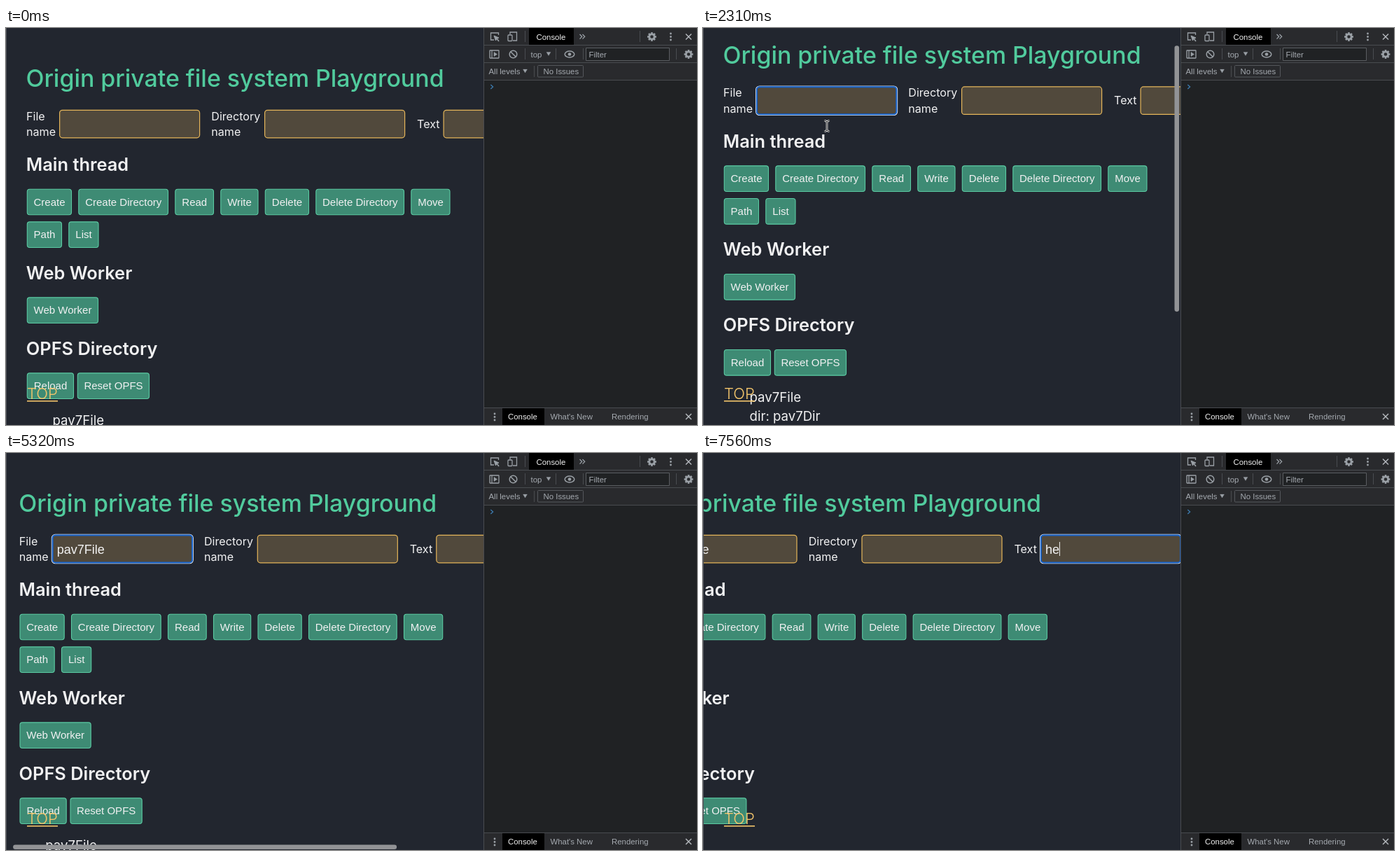
Write an HTML page with a canvas that moves like this. It is 987 px wide and 567 px high and loops after 8000 ms.

```html
<!DOCTYPE html>
<html lang="en">
<head>
<meta charset="utf-8">
<title>File system playground</title>
<style>
html, body { margin: 0; width: 100%; height: 100%; overflow: hidden; background: #22262f; }
canvas { display: block; }
</style>
</head>
<body>
<canvas id="stage" width="987" height="567"></canvas>
<script>
const ctx = document.getElementById('stage').getContext('2d');
const LOOP = 8000, STEP = 70;
const SPLIT = 682;
const PAGE_FONT = 'Inter, "Noto Sans", sans-serif';
const UI_FONT = '"Liberation Sans", Arial, sans-serif';
const LINE = '#494c50', BAR = '#292a2d', ICON = '#9aa0a6';

const BUTTONS = [
  ['Create', 30, 230, 64], ['Create Directory', 103.5, 230, 128.5], ['Read', 241.5, 230, 55.5],
  ['Write', 306.5, 230, 54], ['Delete', 370, 230, 63], ['Delete Directory', 442.5, 230, 126.5],
  ['Move', 578.5, 230, 56], ['Path', 30, 276.7, 50], ['List', 89.5, 276.7, 43],
  ['Web Worker', 30, 384.7, 102], ['Reload', 30, 492.7, 67], ['Reset OPFS', 102, 492.7, 103]
];
const NAME_KEYS = [3640, 3850, 3920, 4060, 4340, 4550, 4690, 4760];
const TEXT_KEYS = [7420, 7560];
const FOCUS_NAME = 1400, FOCUS_TEXT = 6280;

// [time, value] pairs, linear in between
const SCROLL_Y = [[1680, 0], [1750, 2], [1890, 16], [2100, 46], [2170, 50], [2240, 46],
  [2450, 8], [2520, 1], [2590, -1.2], [2660, -0.7], [2870, 0]];
const SCROLL_X = [[5250, 0], [5320, 10.3], [5390, 45], [5460, 85], [5530, 118], [5600, 138],
  [5670, 147], [5810, 146.4], [6020, 142.6]];

function track(keys, t) {
  if (t <= keys[0][0]) return keys[0][1];
  for (let i = 1; i < keys.length; i++) {
    const [t0, a] = keys[i - 1], [t1, b] = keys[i];
    if (t < t1) return a + (b - a) * (t - t0) / (t1 - t0);
  }
  return keys[keys.length - 1][1];
}

const clamp = v => Math.max(0, Math.min(1, v));
const typed = (word, keys, t) => word.slice(0, keys.filter(k => t >= k).length);

function rect(x, y, w, h, color) {
  ctx.fillStyle = color;
  ctx.fillRect(x, y, w, h);
}

function round(x, y, w, h, r, fill, stroke, width = 1) {
  ctx.beginPath();
  ctx.roundRect(x, y, w, h, r);
  if (fill) { ctx.fillStyle = fill; ctx.fill(); }
  if (stroke) { ctx.strokeStyle = stroke; ctx.lineWidth = width; ctx.stroke(); }
}

function text(str, x, y, size, color, font = PAGE_FONT, align = 'left', weight = 400) {
  ctx.font = `${weight} ${size}px ${font}`;
  ctx.textAlign = align;
  ctx.fillStyle = color;
  ctx.fillText(str, x, y);
}

function path(points, color, width = 1.3, close = false, fill = null) {
  ctx.beginPath();
  points.forEach(([x, y], i) => i ? ctx.lineTo(x, y) : ctx.moveTo(x, y));
  if (close) ctx.closePath();
  if (fill) { ctx.fillStyle = fill; ctx.fill(); }
  ctx.strokeStyle = color;
  ctx.lineWidth = width;
  ctx.stroke();
}

function disc(x, y, r, color, width = 0) {
  ctx.beginPath();
  ctx.arc(x, y, r, 0, 7);
  if (width) { ctx.strokeStyle = color; ctx.lineWidth = width; ctx.stroke(); }
  else { ctx.fillStyle = color; ctx.fill(); }
}

function input(x, value, focused, caretOn) {
  round(x + 0.6, 117.3, 200, 39.5, 4, '#51493c', focused ? null : '#e6b65a', 1.2);
  if (focused) {
    round(x - 0.4, 116.3, 202, 41.5, 5, null, '#e6eefa', 1.1);
    round(x + 0.9, 117.6, 199.4, 38.9, 4, null, '#1763cb', 2);
  }
  text(value, x + 7, 143.5, 18, '#f3f3f3', UI_FONT);
  if (focused && caretOn) rect(x + 7 + ctx.measureText(value).width, 127, 1, 20, '#f3f3f3');
}

function caretVisible(t) {
  const keys = [FOCUS_NAME + 65, FOCUS_TEXT, ...NAME_KEYS, ...TEXT_KEYS];
  const last = Math.max(...keys.filter(k => k <= t), 0);
  return Math.floor((t - last) / 500) % 2 === 0;
}

function page(t) {
  const sx = track(SCROLL_X, t), sy = track(SCROLL_Y, t);
  const white = '#f1f1f2';
  ctx.save();
  ctx.beginPath();
  ctx.rect(0, 0, SPLIT, 567);
  ctx.clip();
  rect(0, 0, SPLIT, 567, '#22262f');

  ctx.save();
  ctx.translate(-sx, -sy);
  text('Origin private file system Playground', 28.5, 84, 33.9, '#51cb9d', PAGE_FONT, 'left', 500);
  text('File', 29, 131.7, 16.1, white);
  text('name', 29, 153.9, 16.1, white);
  text('Directory', 293.3, 131.7, 16.1, white);
  text('name', 293.3, 153.9, 16.1, white);
  text('Text', 587, 142.7, 16.1, white);

  const caret = caretVisible(t);
  input(76, typed('pav7File', NAME_KEYS, t), t >= FOCUS_NAME && t < FOCUS_TEXT, caret);
  input(369, '', false, false);
  input(624.5, typed('he', TEXT_KEYS, t), t >= FOCUS_TEXT, caret);

  [['Main thread', 204], ['Web Worker', 358.5], ['OPFS Directory', 466.5]].forEach(([s, y]) =>
    text(s, 28.8, y, 25.4, white, PAGE_FONT, 'left', 600));

  for (const [label, x, y, w] of BUTTONS) {
    round(x + 0.3, y + 0.2, w - 0.8, 36.6, 3.5, '#3e8b74', '#5bcba3', 1.1);
    text(label, x + w / 2, y + 23.7, 15, white, UI_FONT, 'center');
  }
  text('pav7File', 66.5, 567.3, 18.6, white);
  text('dir: pav7Dir', 66.5, 594.3, 18.6, white);
  ctx.restore();

  text('TOP', 30, 530.3, 22, '#f3c56b', PAGE_FONT, 'left', 300);
  rect(30, 532, 44, 1.6, '#f3c56b');

  if (t >= 1750 && t < 3080) scrollbar(673.5, 2.5 + sy * 0.68, 6.6, 380, (3080 - t) / 280);
  if (t >= 5320 && t < 6370) scrollbar(2 + sx * 0.785, 559.5, 548, 6.5, (6370 - t) / 280);
  rect(0, 0, 1, 567, '#4b4e55');
  ctx.restore();
}

function scrollbar(x, y, w, h, alpha) {
  ctx.globalAlpha = clamp(alpha);
  round(x, y, w, h, 3.3, '#929396');
  ctx.globalAlpha = 1;
}

function gear(x, y) {
  for (let i = 0; i < 8; i++) {
    const a = i * Math.PI / 4, c = Math.cos(a), s = Math.sin(a);
    path([[x + 3 * c, y + 3 * s], [x + 6.4 * c, y + 6.4 * s]], ICON, 2.6);
  }
  disc(x, y, 3.7, ICON, 2.8);
}

function dots(x, y) {
  [-4.5, 0, 4.5].forEach(d => disc(x, y + d, 1.4, ICON));
}

function cross(x, y) {
  path([[x - 4, y - 4], [x + 4, y + 4]], '#b5b9be', 1.5);
  path([[x + 4, y - 4], [x - 4, y + 4]], '#b5b9be', 1.5);
}

function down(x, y) {
  path([[x - 3, y - 2.5], [x + 3, y - 2.5], [x, y + 2.5]], ICON, 0.3, true, ICON);
}

function devtools() {
  const ui = (s, x, y, color = '#a5aab0') => text(s, x, y, 11.4, color, UI_FONT);
  rect(SPLIT, 0, 305, 567, '#202224');
  rect(SPLIT, 0, 305, 74, BAR);
  rect(SPLIT, 543, 305, 24, BAR);
  [24, 49, 74, 542].forEach(y => rect(SPLIT, y, 305, 1, LINE));
  rect(SPLIT, 0, 1, 567, LINE);
  [[741, 4], [905, 4], [741, 29], [785, 29], [824, 29], [957, 29], [754, 54]].forEach(([x, y]) =>
    rect(x, y, 1, 16, LINE));

  // top bar
  rect(747, 0, 64, 24, '#000');
  ui('Console', 757.5, 16.5, '#f0f0f0');
  path([[697, 17], [692.5, 17], [692.5, 7], [703.5, 7], [703.5, 10]], ICON);
  path([[697, 11], [704, 14], [701, 15], [699.5, 18]], ICON, 1, true, ICON);
  path([[701, 15], [704, 19]], ICON, 1.5);
  path([[720, 9], [720, 6], [729.5, 6], [729.5, 18], [724, 18]], ICON);
  round(717, 10, 6, 8.5, 1, null, ICON, 1.3);
  [819.5, 823.5].forEach(x => path([[x, 9], [x + 3.2, 12.3], [x, 15.6]], ICON));
  gear(922.5, 12.5);
  dots(949.5, 12.5);
  cross(975, 12.5);

  // console controls
  round(691, 32, 13, 11, 0.5, null, ICON, 1.3);
  path([[694, 32], [694, 43]], ICON, 1.2);
  path([[697, 34.5], [701.5, 37.5], [697, 40.5]], ICON, 0.5, true, ICON);
  disc(724.5, 37.5, 5.3, ICON, 1.5);
  path([[721, 34], [728, 41]], ICON, 1.5);
  ui('top', 749.5, 41.5);
  down(775, 37);
  ctx.beginPath();
  ctx.ellipse(805, 37.5, 6.8, 4.4, 0, 0, 7);
  ctx.strokeStyle = ICON;
  ctx.lineWidth = 1.5;
  ctx.stroke();
  disc(805, 37.5, 2.3, ICON);
  round(828.5, 28.5, 119, 18, 0, '#202224', '#5a5d61');
  ui('Filter', 832.5, 41.8);
  gear(975, 37.5);
  ui('All levels', 689.5, 66);
  down(741.5, 61.5);
  round(759.5, 53.5, 65, 16.5, 1, null, '#55585c');
  ui('No Issues', 767.5, 66);
  path([[692.3, 81], [695.6, 84], [692.3, 87]], '#3c7cb0', 1.3);

  // drawer
  rect(709, 543, 60, 24, '#000');
  dots(698, 555.5);
  ui('Console', 717, 559.2, '#f0f0f0');
  ui("What's New", 777.5, 559.2);
  ui('Rendering', 865, 559.2);
  cross(975, 555);
}

function arrow(x, y) {
  path([[x, y], [x, y + 14], [x + 3.3, y + 11], [x + 5.6, y + 16.3], [x + 8, y + 15.2],
    [x + 5.8, y + 10.2], [x + 10, y + 10]], '#f4f4f4', 1.2, true, '#0b0b0b');
}

function beam(x, y) {
  const stem = [[x, y - 6], [x, y + 6]];
  const caps = [-1, 1].map(s => [[x - 3.5, y + 7.5 * s], [x - 1.5, y + 7.3 * s], [x, y + 6 * s],
    [x + 1.5, y + 7.3 * s], [x + 3.5, y + 7.5 * s]]);
  [['#f0f0f0', 2.7], ['#151515', 1]].forEach(([color, width]) =>
    [stem, ...caps].forEach(p => path(p, color, width)));
}

function pointer(t) {
  if (t >= 70 && t < 3850) {
    const k = 1 - Math.pow(1 - clamp((t - 70) / 1050), 2);
    const x = 480 - 303 * k, y = 330 - 190 * k;
    const sy = track(SCROLL_Y, t);
    const overField = x < 277 && y > 117 && y < 157;
    (overField || sy > 20 ? beam : arrow)(x, y);
  } else if (t >= 5670 && t < 7140) {
    const x = track([[5670, 250], [5810, 391], [6090, 505.5]], t);
    const y = track([[5670, 125], [5810, 104], [6090, 122]], t);
    (x > 482 ? beam : arrow)(x, y);
  }
}

function draw(now) {
  const t = Math.floor((now % LOOP) / STEP) * STEP;
  page(t);
  devtools();
  pointer(t);
}

let start = null;
function frame(now) {
  if (start === null) start = now;
  draw(now - start);
  requestAnimationFrame(frame);
}
draw(0);
requestAnimationFrame(frame);
</script>
</body>
</html>
```
